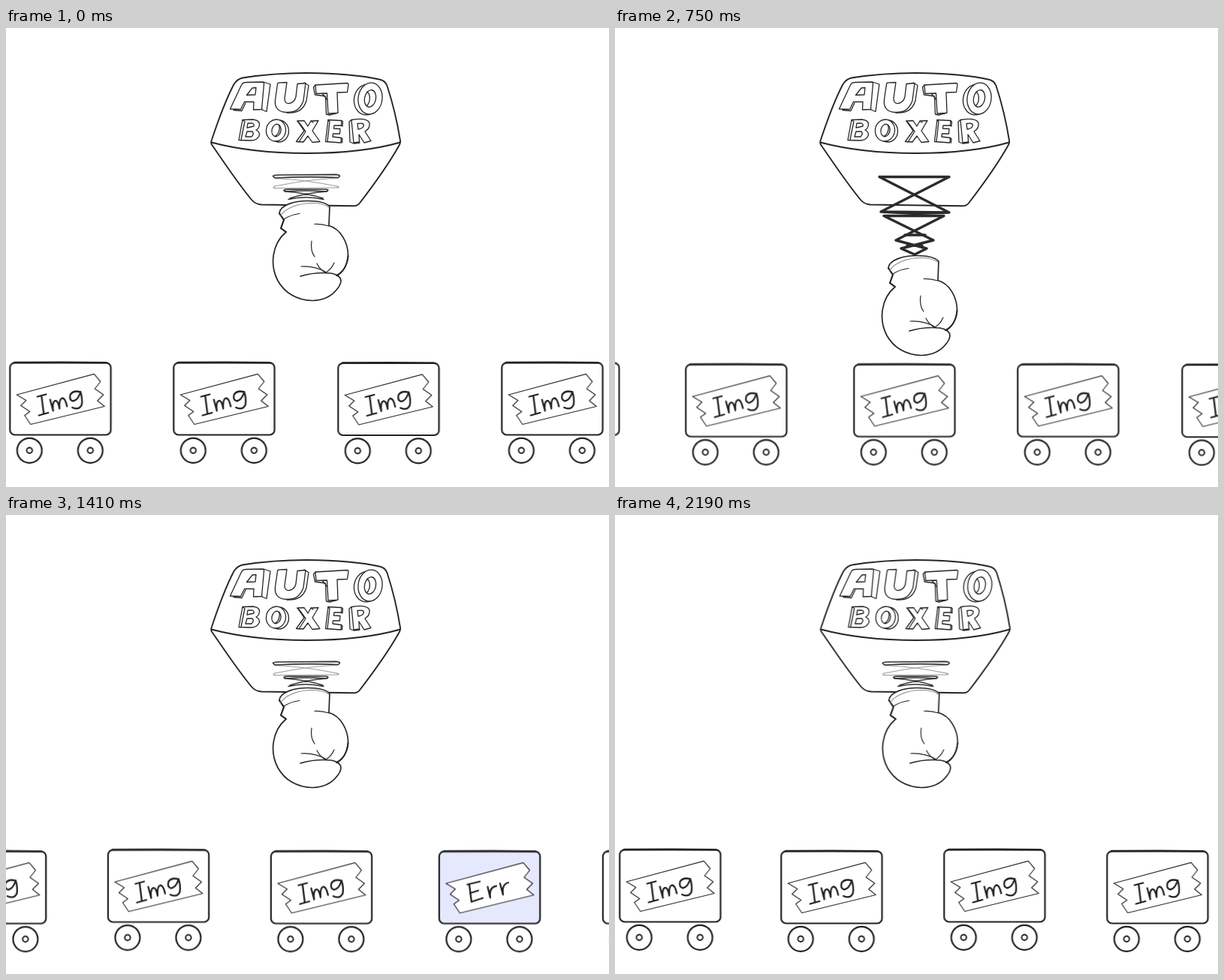
Animation, 803 px wide and 612 px high, one loop 2.22 s. Source, as an HTML page:

```html
<!DOCTYPE html>
<html lang="en">
<head>
<meta charset="utf-8">
<title>Auto Boxer</title>
<style>
@property --y { syntax: "<number>"; inherits: true; initial-value: 0; }

html, body { margin: 0; width: 100%; height: 100%; overflow: hidden; background: #fff; }
svg { display: block; width: 803px; height: 612px; }
svg * { animation-duration: 2220ms; animation-iteration-count: infinite; animation-timing-function: step-end; }
path, rect, circle, ellipse { stroke-linecap: round; stroke-linejoin: round; }

.ink { stroke: #262626; fill: #fff; }
.line { fill: none; }

/* one step per 30 ms */
#train { animation-name: roll; }
@keyframes roll {
  0% { transform: translate(0, 0); animation-timing-function: steps(9); }
  12.1622% { transform: translate(112.7px, 2px); animation-timing-function: steps(19); }
  37.8378% { transform: translate(350.5px, 2.4px); animation-timing-function: steps(45); }
  98.6486%, 100% { transform: translate(874px, 2px); }
}

#next { animation-name: settle-next; }
@keyframes settle-next { 0% { transform: translateX(3px); } 22.973%, 100% { transform: none; } }
#third { animation-name: settle-third; }
@keyframes settle-third { 0% { transform: translateX(-6px); } 37.8378%, 100% { transform: none; } }

#hit { animation-name: tint; }
@keyframes tint { 0% { fill: #fff; } 35.135%, 100% { fill: #e6e8fd; } }
#ok { animation-name: hide; }
@keyframes hide { 0% { opacity: 1; } 35.135%, 100% { opacity: 0; } }
#bad { animation-name: show; }
@keyframes show { 0% { opacity: 0; } 35.135%, 100% { opacity: 1; } }

#machine { animation-name: nudge; }
@keyframes nudge { 0% { transform: none; } 74.3243%, 100% { transform: translateX(.7px); } }

#puncher { animation-name: punch; }
@keyframes punch {
  0% { --y: 0; }
  29.730% { --y: 10; }
  31.081% { --y: 28; }
  32.432% { --y: 51; }
  33.784% { --y: 73; }
  35.135% { --y: 84; }
  36.486% { --y: 80; }
  37.838% { --y: 62; }
  39.189% { --y: 40; }
  40.541% { --y: 20; }
  41.892% { --y: 6; }
  43.243%, 100% { --y: 0; }
}
#glove { transform: translateY(calc(var(--y) * 1px)); }
#coil { opacity: calc(1 - var(--y)); }
#spring {
  opacity: var(--y);
  transform-origin: 0 198px;
  transform: scaleY(calc((32 + var(--y)) / 105));
}
#spring path { vector-effect: non-scaling-stroke; }
</style>
</head>
<body>
<svg viewBox="0 0 803 612" role="img" aria-label="Auto Boxer punching carts labelled Img and Err">
  <defs>
    <g id="wheel" fill="#fff" stroke="#222">
      <circle r="16.5" stroke-width="2.2"/>
      <circle r="3.7" stroke-width="2"/>
    </g>
    <g id="frame">
      <rect x="1" y="446.3" width="134.3" height="96.2" rx="6.5" stroke="#222" stroke-width="2.2"/>
      <path class="line" d="M7 446L70 445.8L129 446.2" stroke="#222" stroke-width="2.6"/>
      <use href="#wheel" x="27" y="563.3"/>
      <use href="#wheel" x="108" y="563.3"/>
      <path d="M10 489L113 461.3L121.500 471.500L114 481L125.500 489L117.500 497L127 504.500L28.500 528.500L20.500 516.500L27.500 511.500L15.500 503.500L22.500 496.500Z" fill="#fff" stroke="#2c2c2c" stroke-width="1.2"/>
    </g>
    <g id="img" class="line" stroke="#222" stroke-width="2.3">
      <path d="M37.500 491.500L49 488.500M43 490.500L46 514.500M39.500 516.500L52 513"/>
      <path d="M54.500 495.500L58.500 510.500Q57 499 61 497Q65 496 67 507.500Q66 495 70.500 493.500Q74.500 493 77 504.500"/>
      <path d="M95 485.500Q86 482.500 81.500 488.500Q79.500 496 85 497.500Q91.500 496.500 95 485Q98 495 96.500 502.500Q93 510 84 506"/>
    </g>
    <g id="err" class="line" stroke="#222" stroke-width="2.3">
      <path d="M38.500 490.500L55 486.500M41 490L44 513.500L59 508.500M42 502L53 498.500"/>
      <path d="M65.500 493.500L69 508Q67 494 77 492.500"/>
      <path d="M82 489L86 504Q84 490 93 488"/>
    </g>
    <g id="cart"><use href="#frame"/><use href="#img"/></g>
  </defs>

  <rect width="803" height="612" fill="#fff"/>

  <g transform="translate(-.7)">
    <g id="train" fill="#fff">
      <use href="#cart" x="660"/>
      <use href="#cart" x="442" y=".5"/>
      <use href="#cart" x="223"/>
      <g transform="translate(5)">
        <use id="hit" href="#frame"/>
        <use id="ok" href="#img"/>
        <use id="bad" href="#err"/>
      </g>
      <g id="next"><use href="#cart" x="-219"/></g>
      <g id="third"><use href="#cart" x="-436" y="-2"/></g>
      <use href="#cart" x="-653"/>
      <use href="#cart" x="-868" y="-2"/>
    </g>
  </g>

  <g id="machine">
    <g class="ink" stroke-width="1.9">
      <path d="M315 66.500C350 61 375 60 400 60C440 60.500 475 63.500 497 68.500Q505 70 507.500 77C515 100 521 125 525 150Q525.500 154 523 157.500C507 186 489 210 471 233.500Q468 237.500 462 237.300L340 235.500Q332 235 327 229C308 206 291 180 274 155.500Q272.500 153 274 149C282 125 292 97 303.500 75Q308 68 315 66.500Z"/>
      <path class="line" d="M273.500 152.500C315 163.500 355 167 400 167C445 167 490 162.500 525 152.500"/>
    </g>

    <g class="ink" stroke-width="1.3">
      <path d="M343 72L352 75L347 111.500L341 109L338 100Z"/>
      <path d="M298.500 108L313.500 76Q315.500 72.500 319 72.500L341 72Q344 72 343.500 75L340.500 108.500L329.500 109L330 98.500L317.500 98.500L312.500 108.500Z"/>
      <path d="M320.500 89.500L328 80L333 79.500L332 89Z"/>
      <path class="line" d="M303 109.500L314 110.500L319 100"/>

      <path d="M397 73L403 76.500L400 97C396 110 386 114 374 113L390 98Z"/>
      <path d="M361.500 75Q361.500 73 364 72.800L374 72.500L371 94Q371 101 377 100.500Q384 99.500 386 92L388 74.500L399 73.500L396 97C391 110 384 112.500 374 112.500C362 112 357.500 106 358.500 96Z"/>

      <path d="M412 76L409.500 79L411.500 89L425.500 91L426.500 115L431 116L442 113Z"/>
      <path d="M412 76L454 73.500Q456 73.500 456 75.500L454.500 85.500L441 86L442 112Q442 113.500 440 113.500L429 114L427.500 87L413 87.500Z"/>

      <ellipse cx="480.500" cy="95.500" rx="17" ry="20.500" transform="rotate(8 480.500 95.500)"/>
      <ellipse cx="485" cy="94" rx="16" ry="21" transform="rotate(8 485 94)"/>
      <ellipse cx="485" cy="94" rx="7.500" ry="11.500" transform="rotate(12 485 94)"/>
      <path class="line" d="M481 85C486 89 485 99 481 103"/>

      <path d="M315 122.500L329 122Q338 123 337.500 129Q337 134 333 136Q339 139 337 144Q334 150 326 150L310 149.500Z"/>
      <path d="M322 127L328 127Q331 128 330 131L321 133ZM321 138L328 138Q331 141 327 145L319 145Z"/>
      <path class="line" d="M315 123L318 124.500L313 149"/>

      <ellipse cx="363.500" cy="137.500" rx="13" ry="14.500"/>
      <ellipse cx="359.500" cy="136.500" rx="13" ry="14.500" transform="rotate(10 359.500 136.500)"/>
      <ellipse cx="360" cy="136.500" rx="6" ry="8.300" transform="rotate(12 360 136.500)"/>
      <path class="line" d="M363 129C366 134 363 142 358 144.500"/>

      <path d="M388 124L397 123.500L402 131L406 124L416 123.500L408 137L418 151.500L408 152.500L402 144L396 152L386.500 151.500L397 137Z"/>
      <path class="line" d="M388 124L391 127L399 138L390 152M406 124L409 126"/>

      <path d="M429 122.500L447 123.500L446.500 130L437 130L436.500 134L445 134.500L444.500 141L435.500 141L435 145L446.500 146.500L446 153L425.500 151.500Z"/>
      <path class="line" d="M429 122.500L431 125L428 151.500M447 123.500L448.500 125L448 131L446.500 130M446.500 146.500L448 148L447.500 153"/>

      <path d="M460 122.500L457 125L458 152L463 154L471 153L465 136Z"/>
      <path d="M460 122.500Q481 119 484 126.500Q485 134 478 138L486 150.500L477 153L470 142L470.500 152L463 153Z"/>
      <path d="M468 127.500Q476 126 476.500 129.500Q476 134 469 135Z"/>
    </g>

    <g id="puncher">
      <g id="coil" class="line" stroke="#333" stroke-width="1.7">
        <g stroke="#9a9a9a" stroke-width="1.200">
          <path d="M358 200.500Q398 202 441 211M442 200Q400 202 358 211"/>
          <path d="M358 211Q353 214 361 213.500L439 213Q446 213 441 211"/>
        </g>
        <path d="M359 200Q351 196.500 362 196L439 195.300Q448 196 442 199.500Q400 197.500 359 200Z"/>
        <path d="M372 218Q367 215.500 376 215.200L423 215Q432 215 427 218Q400 216 372 218Z"/>
        <path d="M372 218Q401 220 422 227M427 218Q399 220 378 227M376 228.500Q399 223 423 228.500" stroke-width="1.4"/>
      </g>

      <g id="spring" class="line" stroke="#2b2b2b" stroke-width="3.4">
        <path d="M352 198.500H445L354 245L445 246L352 198.500M354 245L400 247.500L445 246"/>
        <path d="M358 250.500L438 250.500L374 283L415 294L399 302L381 294L424 283L358 250.500"/>
        <path d="M386 276H413M389 290H409"/>
      </g>

      <g id="glove" class="ink" stroke-width="1.7">
        <path d="M364 247C365 236 384 230.500 402 230.500C416 230.500 426 233 431 238L430 263.500C446 268 456 287 455.500 304C454.500 317 448 326 441 330C449 334 446 342 441 348C435 356 424 363 408 363.500C387 363 371 353 362 337C351 316 354 288 373 272L366 267L370 256Z"/>
        <path class="line" d="M364 247L370 256L366 267L373 272" stroke-width="2"/>
        <path class="line" d="M366 250C372 240 390 233.500 407 233.500Q422 233.500 430 239" stroke="#888" stroke-width="1.1"/>
        <g class="line" stroke-width="1.2">
          <path d="M370 255Q379 249 391 247.500M411 261.500Q420 261 430 264"/>
          <path d="M407 284Q405 297 411 305"/>
          <path d="M393 318Q412 317 426 325.500M414 314Q418 322 425 326M437 313Q433 322 426 326"/>
          <path d="M392 331Q412 325 433 327Q439 328 443 331" stroke-width="1.5"/>
        </g>
        <path class="line" d="M455.500 304C454.500 317 448 326 440 330" stroke-width="2"/>
      </g>
    </g>
  </g>
</svg>
</body>
</html>
```
